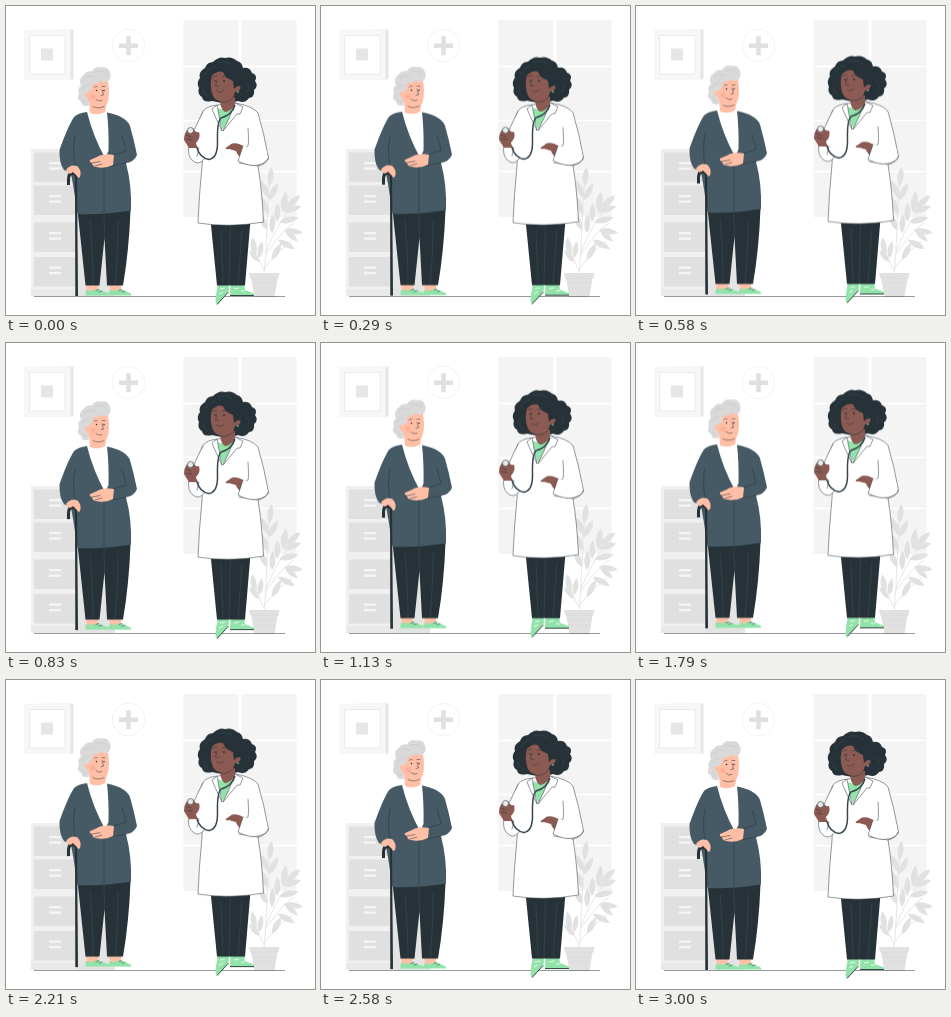
Recreate the animation shown at these times as an HTML page. Size 309x309 px, loop 3040 ms.

```html
<!DOCTYPE html>
<html lang="en">
<head>
<meta charset="utf-8">
<title>Doctor and patient</title>
<style>
  html, body { margin: 0; width: 100%; height: 100%; overflow: hidden; background: #fff; }
  svg { display: block; width: 100%; height: 100%; }
  .float { animation: float 3.04s ease-in-out infinite; }
  @keyframes float { 50% { transform: translateY(-5px); } }
  .ink { fill: #263238; }
  .line { fill: none; stroke: #263238; stroke-width: .5; stroke-linecap: round; stroke-linejoin: round; }
  .seam { fill: none; stroke: #455a64; stroke-width: .4; }
  .coat { fill: #fff; stroke: #263238; stroke-width: .5; stroke-linejoin: round; }
  .knit { fill: #455a64; }
  .pale { fill: #ffbfa6; }
  .brown { fill: #8b5a52; }
  .mint { fill: #92e3a9; }
</style>
</head>
<body>
<svg viewBox="0 0 309 309">
  <defs>
    <path id="leaf" d="M0 0C-4-5-4-13 0-19C4-13 4-5 0 0Z"/>
    <g id="drawer">
      <rect x="28" width="42" height="29.500" fill="#e0e0e0"/>
      <path d="M43 9.500H55V11.800H43ZM43 15H55V17.200H43Z" fill="#f5f5f5"/>
    </g>
  </defs>

  <!-- window -->
  <rect x="177.500" y="14" width="113" height="197" fill="#f4f4f4"/>
  <path d="M234 14V211" stroke="#fff" stroke-width="3"/>
  <path d="M177.500 60.500H290.500M177.500 114.500H290.500M177.500 165.500H290.500" stroke="#fff" stroke-width="1.400"/>

  <!-- picture -->
  <path d="M18 24L67.500 23.500V73L64 74H18Z" fill="#e6e6e6"/>
  <rect x="18" y="24" width="46.500" height="50" fill="#f7f7f7"/>
  <rect x="23.500" y="29.500" width="35.500" height="38.500" fill="#fff" stroke="#ebebeb" stroke-width="1"/>
  <rect x="35" y="42.500" width="12" height="12" fill="#e6e6e6"/>

  <!-- cross -->
  <circle cx="122.500" cy="39.500" r="16.300" fill="#fff" stroke="#ebebeb" stroke-width=".6"/>
  <path d="M113 39.800H132M122.500 30.300V49.300" stroke="#e0e0e0" stroke-width="4.500"/>

  <!-- cabinet -->
  <path d="M70 143H109V290H70Z" fill="#e4e4e4"/>
  <path d="M25 143H70V290H25Z" fill="#f0f0f0"/>
  <use href="#drawer" y="146.500"/>
  <use href="#drawer" y="179.500"/>
  <use href="#drawer" y="216.500"/>
  <use href="#drawer" y="251"/>
  <path d="M25 283H70V290H25Z" fill="#e9e9e9"/>

  <!-- plant -->
  <g fill="#e1e1e1">
    <path d="M258 268C261 240 261 205 264 168M260 246C267 228 274 216 286 200M260 248C270 235 276 225 288 217M258 265C252 252 249 245 246 236M259 262C268 249 276 243 286 235" fill="none" stroke="#e0e0e0" stroke-width=".8"/>
    <use href="#leaf" transform="translate(263.500 180) rotate(6)"/>
    <use href="#leaf" transform="translate(263 192) rotate(-24)"/>
    <use href="#leaf" transform="translate(263 194) rotate(28)"/>
    <use href="#leaf" transform="translate(262 208) rotate(-22)"/>
    <use href="#leaf" transform="translate(261 224) rotate(-24)"/>
    <use href="#leaf" transform="translate(280 202) rotate(48)"/>
    <use href="#leaf" transform="translate(277 206) rotate(8) scale(1.100)"/>
    <use href="#leaf" transform="translate(277 206) rotate(72)"/>
    <use href="#leaf" transform="translate(271 216) rotate(2)"/>
    <use href="#leaf" transform="translate(273 216) rotate(78) scale(1.050)"/>
    <use href="#leaf" transform="translate(266 227) rotate(2)"/>
    <use href="#leaf" transform="translate(278 224) rotate(98)"/>
    <use href="#leaf" transform="translate(279 224) rotate(132) scale(.9)"/>
    <use href="#leaf" transform="translate(272 234) rotate(118)"/>
    <use href="#leaf" transform="translate(266 254) rotate(28)"/>
    <use href="#leaf" transform="translate(249 250) rotate(-8)"/>
    <use href="#leaf" transform="translate(253 256) rotate(-40) scale(.8)"/>
    <use href="#leaf" transform="translate(253 252) rotate(10) scale(.9)"/>
    <path d="M243 267H273.500L272.500 272H271.500L268.500 291H248.500L245 272H244Z"/>
    <path d="M244.500 272.300H272.500M246 277H271M247 282H270" stroke="#d2d2d2" stroke-width=".5"/>
  </g>

  <path d="M28 290.500H279" stroke="#263238" stroke-width=".5"/>

  <g class="float">
    <!-- patient -->
    <g>
      <path class="pale" d="M80 277H92L92 285H81ZM103 277H115L115 285H104Z"/>
      <path class="mint" d="M80 284Q86 286 91 283Q96 285 102 287Q104 288 103 289.500H79.500Q79 286 80 284ZM104 284Q109 286 114 283Q119 285 124 287Q126 288 125 289.500H102.500Q102 286 104 284Z"/>
      <path class="line" d="M90 284.500L93 283.500M93 286L96 285M113 284.500L116 283.500M116 286L119 285"/>
      <path class="ink" d="M71.500 204H124.500Q123 245 117 279.500H101L98.500 232L93.500 279.500H79.500Z"/>
      <path class="seam" d="M98 208L98.500 232M84 214Q87 250 87 279M112 214Q112 250 109 279"/>

      <path d="M81 107L101 106L104 147L98 150L86 128Z" fill="#fff"/>
      <path class="pale" d="M83 94L101 96L99 106Q92 110 84 107Z"/>
      <path class="knit" d="M81 106Q72 107 68 111Q62 120 53.500 144Q53 157 58 164L65 167Q69 190 71.500 208Q99 209 125 204.500Q126 180 120 157Q128 156 131 149Q128 134 124 120Q120 110 101 106.500Q103 124 102.500 145L99 152Q87 130 81 106Z"/>
      <path class="line" d="M69 130Q66 144 69 160M116 130Q119 139 120 145L107 149M120 157L105 160M98 152V206"/>
      <path class="pale" d="M108 149Q97 147 91 151L84 154Q83 156 86 157Q86 160 90 161Q99 163 107 159Z"/>
      <path class="line" d="M86 157L94 155.500M89 160L96 158"/>

      <path class="ink" d="M61 179Q60.500 169 63 166Q68 163 71 167L72 290H69.300L69 170Q65 167 64 172L64 179Z"/>
      <path class="pale" d="M60 164Q64 158 71 160Q76 164 74 171Q72 173 71 170L67 166Q64 169 62 167Z"/>

      <g transform="translate(0 -1.500)">
        <path class="pale" d="M83 79Q92 72 102 77Q104 88 102 97Q99 105 92 104Q84 102 81 95Q76 94 77 89Q79 86 82 88Z"/>
        <path d="M83 101Q76 103 75 97Q70 95 73 89Q71 84 75 81Q72 74 78 70Q81 66 86 67Q89 61 96 63Q102 62 104 68Q106 73 102 77Q98 79 95 76Q91 80 86 79Q88 84 83 87Q78 87 79 92Q83 94 83 101Z" fill="#d9d9d9"/>
        <path d="M78 75Q83 69 89 73M89 68Q96 65 101 70M76 85Q78 80 83 81M76 94Q78 98 81 98" fill="none" stroke="#bbb" stroke-width=".4"/>
        <path class="line" d="M88 83Q89 81 91 82M96 82L99 82M96 85L97.500 90.500L95 91M90 95Q93 98 96 96M87 102Q92 105 98 102"/>
        <circle class="ink" cx="90.500" cy="86" r=".8"/>
        <circle class="ink" cx="98" cy="86" r=".8"/>
        <circle cx="87" cy="92" r="2.500" fill="#ff9784" opacity=".4"/>
      </g>
    </g>

    <!-- doctor -->
    <g>
      <path class="mint" d="M212 278H222.500L223 284Q219 291 211 298.500L209.500 296Q210 286 212 278ZM224.500 278H238L239 284L248 287.500V289.500H224Z"/>
      <path d="M211 298.500L222.500 286M224 289.500H248" fill="none" stroke="#263238" stroke-width=".9"/>
      <path d="M214 283L219 282M213 288L217 286M228 283L233 282M235 285L239 285" stroke="#fff" stroke-width=".8"/>
      <path class="ink" d="M204.500 214H244.500L239 279.500H211Z"/>
      <path class="seam" d="M224.500 220L223 279M215 224L217 278M236 224L232 278"/>

      <path class="ink" d="M206 95Q197 97 196 91Q191 88 193 82Q190 76 194 72Q192 66 199 62Q201 56 207 56Q213 50 219 52Q226 50 231 55Q236 56 237 62Q244 61 246 67Q252 69 249 75Q253 80 248 84Q249 91 243 92Q239 98 232 95L221 98Z"/>
      <path class="seam" d="M199 69Q203 61 209 61M212 57Q222 53 228 61M240 77Q245 80 241 86M197 83Q198 88 202 91"/>
      <path class="coat" d="M212 99Q201 100 197 105Q190 120 188 133L197 139L196 160Q193 190 192 217Q223 222 257.500 216Q256 184 252 160Q260 158 262.500 152Q258 127 252 107Q247 100 229 97Z"/>
      <path class="mint" d="M212 102Q220 106 229 100L224 111L217 124L212 108Z"/>
      <path class="brown" d="M214 91H229V99Q224 106 219 106Q214 104 214 91Z"/>
      <path class="coat" d="M211 99L206 103L209 110L216 125L213 110ZM229 97L237 101L234 108L231 108L217 125L224 110Z"/>
      <path class="line" d="M242 122Q243 136 242 140L234 144M233 157L252 160"/>

      <!-- arm with the stethoscope -->
      <path d="M197 106Q189 120 183 139Q181 150 187 155Q193 160 198 153L200 126Z" fill="#fff"/>
      <path class="line" d="M197 106Q189 120 183 139Q181 150 187 155Q193 160 198 153M186 138L193 142L191 150"/>
      <path d="M229 99Q226 109 215 112Q211 116 211.500 135Q212 152 203 153.500Q194 152 191 142Q188 138 187 127" fill="none" stroke="#37474f" stroke-width="1.500"/>
      <path class="brown" d="M183 142L178 134Q178 128 181 124L187 122Q189 127 193 126Q195 132 190 137L191 142Z"/>
      <circle cx="184.500" cy="124.500" r="3" fill="#ebebeb" stroke="#455a64" stroke-width=".7"/>
      <path class="line" d="M180 129L185 131M181 133L186 134"/>
      <path class="brown" d="M239 141Q232 136 226 137.500L219.500 142Q220 144 223 143L230 145Q231 150 238 153Z"/>
      <path d="M237 140L232 155Q244 161 252 159Q262 156 261 145Z" fill="#fff"/>
      <path class="line" d="M237 140L232 155Q244 161 252 159Q261 157 262.500 152"/>

      <path class="brown" d="M206 69Q210 62 221 64L229 76Q235 75 235 80Q234 86 229 86Q227 95 219 96Q210 96 207 90Q203 81 206 69Z"/>
      <path class="ink" d="M206 70Q211 64 217 66Q219 72 227 75L228 83Q232 78 235 81Q240 71 231 62Q217 54 207 63Z"/>
      <path class="line" d="M207 71L211 70M216 71Q219 69 222 72M211 74L209.500 80L213 80.500M211 85Q214 88 218 84M212 95Q220 99 227 92"/>
      <circle class="ink" cx="209" cy="75" r=".8"/>
      <circle class="ink" cx="218" cy="75" r=".9"/>
      <circle class="mint" cx="232" cy="86" r=".8"/>
    </g>
  </g>
</svg>
</body>
</html>
```
